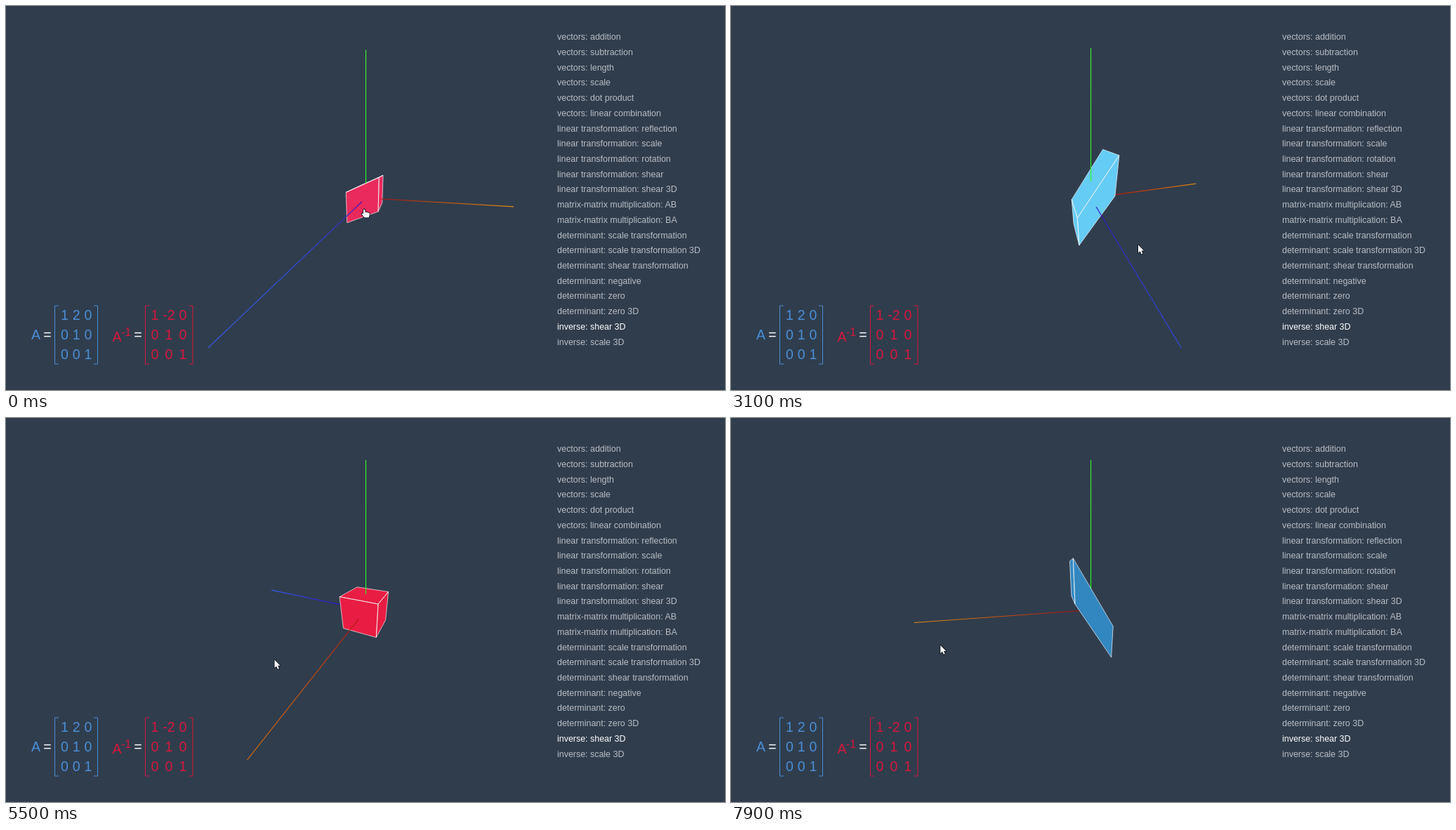
An HTML page with a canvas for the animation above (8000 ms loop, 1024x547 px).

```html
<!DOCTYPE html>
<html lang="en">
<head>
<meta charset="utf-8">
<title>Inverse of a 3D shear</title>
<style>
  html, body { margin: 0; width: 100%; height: 100%; overflow: hidden; background: #303d4d; }
  svg, canvas { position: absolute; left: 0; top: 0; width: 1024px; height: 547px; }
  text { font-family: "Liberation Sans", Arial, sans-serif; }
  .menu { font-size: 12.45px; fill: #b9bec4; }
  .menu .on { fill: #fff; }
  .math { font-size: 19.6px; text-anchor: middle; fill: #fff; }
  .math path { fill: none; stroke-width: 1; }
  .a text { fill: #4a8fd8; } .a path { stroke: #4a8fd8; }
  .b text { fill: #d8173d; } .b path { stroke: #d8173d; }
</style>
</head>
<body>
<svg viewBox="0 0 1024 547">
  <g class="menu" id="menu"></g>
  <g class="math">
    <g class="a" id="matA"><text x="42.5" y="474.8">A</text><path d="M75 427H69.5V510H75M125 427H130.5V510H125"/></g>
    <text x="59" y="474.8">=</text>
    <g class="b" id="matB"><text x="158" y="477.6">A</text><text x="171" y="469.6" font-size="16">-1</text><path d="M204 427H198.5V510H204M260.5 427H266V510H260.5"/></g>
    <text x="188" y="474.8">=</text>
  </g>
</svg>
<canvas id="scene" width="1024" height="547"></canvas>
<script>
const ns = 'http://www.w3.org/2000/svg';
function addText(parent, x, y, string, cls) {
  const el = document.createElementNS(ns, 'text');
  el.setAttribute('x', x);
  el.setAttribute('y', y);
  if (cls) el.setAttribute('class', cls);
  el.textContent = string;
  document.getElementById(parent).append(el);
}

const topics = {
  'vectors': ['addition', 'subtraction', 'length', 'scale', 'dot product', 'linear combination'],
  'linear transformation': ['reflection', 'scale', 'rotation', 'shear', 'shear 3D'],
  'matrix-matrix multiplication': ['AB', 'BA'],
  'determinant': ['scale transformation', 'scale transformation 3D', 'shear transformation', 'negative', 'zero', 'zero 3D'],
  'inverse': ['shear 3D', 'scale 3D']
};
Object.entries(topics)
  .flatMap(([topic, items]) => items.map(item => `${topic}: ${item}`))
  .forEach((s, i) => addText('menu', 785, 48.2 + i * 21.72, s, s === 'inverse: shear 3D' ? 'on' : ''));

function addMatrix(id, x, step, rows) {
  rows.forEach((row, r) => row.split(' ').forEach((n, c) => addText(id, x + c * step, 446.7 + r * 28, n)));
}
addMatrix('matA', 83.5, 16.7, ['1 2 0', '0 1 0', '0 0 1']);
addMatrix('matB', 212, 20, ['1 -2 0', '0 1 0', '0 0 1']);

// Lengths are in units of one axis.
const LOOP = 8000, STEP = 100;
const CX = 512.5, CY = 273.5, TOP = 60, BOTTOM = 487;
const FOCAL = (BOTTOM - TOP) / 2 / Math.tan(50 * Math.PI / 180);
const HALF = 0.125, NEAR = 0.12;
const SHEAR_TIME = 3030, SHEAR_START = -708;

// Turning points of the drag, as [time, angle].
const yawTurns = [[0, 14], [1860, 14], [2950, -17.5], [4200, 20.5], [6690, 192.6], [7100, 192.6], [8000, 166]];
const pitchTurns = [[0, 13.7], [1700, 13.7], [2950, 28.2], [4200, 33.2], [5400, 31.5], [6600, 12.6], [7100, 12.6], [8000, 18.1]];

// Colours over one shear (phase 0 to 1) and its inverse (1 to 2).
const tints = [
  [0, 232, 26, 60], [.23, 236, 41, 91], [.58, 7, 125, 145], [.87, 55, 136, 197],
  [1.26, 101, 205, 245], [1.59, 150, 0, 19], [2, 232, 26, 60]
];
const axes = [
  { dir: [1, 0, 0], from: [170, 0, 12], to: [225, 140, 15] },
  { dir: [0, 1, 0], from: [40, 250, 40], to: [65, 240, 45] },
  { dir: [0, 0, 1], from: [45, 0, 190], to: [50, 100, 240] }
];
// Corner numbers: bit 0 is x, bit 1 is y, bit 2 is z.
const faces = {
  right: [1, 3, 7, 5], left: [0, 4, 6, 2], top: [2, 6, 7, 3],
  bottom: [0, 1, 5, 4], front: [4, 5, 7, 6], back: [0, 2, 3, 1]
};

const ctx = document.getElementById('scene').getContext('2d');
const mix = (a, b, u) => a + (b - a) * u;
const smooth = u => u * u * (3 - 2 * u);
const linear = u => u;
const rgb = c => `rgb(${c.map(Math.round).join()})`;

function sample(track, t, ease) {
  const i = track.findIndex(key => key[0] > t);
  const a = track[i - 1], b = track[i];
  const u = ease((t - a[0]) / (b[0] - a[0]));
  return a.slice(1).map((v, n) => mix(v, b[n + 1], u));
}

function makeCamera(yaw, pitch, distance) {
  const rad = Math.PI / 180;
  const cy = Math.cos(yaw * rad), sy = Math.sin(yaw * rad);
  const cp = Math.cos(pitch * rad), sp = Math.sin(pitch * rad);
  const depth = ([x, y, z]) => distance - (x * sy + z * cy) * cp - y * sp;
  const project = p => {
    const [x, y, z] = p, w = FOCAL / depth(p);
    return [CX + (x * cy - z * sy) * w, CY - (y * cp - (x * sy + z * cy) * sp) * w];
  };
  return { depth, project };
}

function trace(points) {
  ctx.beginPath();
  points.forEach(p => ctx.lineTo(...p));
}

function drawAxis({ dir, from, to }, start, cam) {
  const at = a => dir.map(v => v * a);
  const d0 = cam.depth([0, 0, 0]), slope = cam.depth(dir) - d0;
  const end = d0 + slope < NEAR ? (NEAR - d0) / slope : 1;
  const p = cam.project(at(start)), q = cam.project(at(end));
  const w0 = 1 / cam.depth(at(start)), w1 = 1 / cam.depth(at(end));
  const paint = ctx.createLinearGradient(...p, ...q);
  for (let i = 0; i <= 12; i++) {
    const u = i / 12;
    const a = mix(start * w0, end * w1, u) / mix(w0, w1, u);
    paint.addColorStop(u, rgb(from.map((v, n) => mix(v, to[n], a))));
  }
  trace([p, q]);
  ctx.strokeStyle = paint;
  ctx.stroke();
}

function drawScene(t) {
  const [yaw] = sample(yawTurns, t, smooth), [pitch] = sample(pitchTurns, t, smooth);
  const phase = (t - SHEAR_START) / SHEAR_TIME % 2;
  const k = 2 * (1 - Math.abs(1 - phase));
  const clicks = [500, 800, 1100].filter(time => t >= time).length;
  const cam = makeCamera(yaw, pitch, 1.0607 * 0.95 ** clicks);

  const corners = [...Array(8).keys()].map(n => {
    const [x, y, z] = [1, 2, 4].map(bit => n & bit ? HALF : -HALF);
    return cam.project([x, y + k * x, z]);
  });
  const outline = name => faces[name].map(n => corners[n]);
  const isVisible = name => {
    const [a, b, c] = outline(name);
    return (b[0] - a[0]) * (c[1] - a[1]) - (b[1] - a[1]) * (c[0] - a[0]) < 0;
  };
  // The face through which each axis leaves the box.
  const exits = [k > 1 ? 'bottom' : 'right', 'top', 'front'];
  const drawAxes = inFront => axes.forEach((axis, i) => {
    const start = i ? HALF : HALF / Math.max(1, k);
    if (isVisible(exits[i]) === inFront) drawAxis(axis, start, cam);
  });

  ctx.save();
  ctx.beginPath();
  ctx.rect(0, TOP, 1024, BOTTOM - TOP);
  ctx.clip();
  ctx.lineWidth = 1.15;
  ctx.lineJoin = 'round';
  drawAxes(false);
  const shown = Object.keys(faces).filter(isVisible);
  ctx.fillStyle = rgb(sample(tints, phase, linear));
  shown.forEach(name => { trace(outline(name)); ctx.fill(); });
  ctx.lineWidth = 1;
  ctx.strokeStyle = 'rgba(255,255,255,.65)';
  shown.forEach(name => { trace(outline(name)); ctx.closePath(); ctx.stroke(); });
  ctx.lineWidth = 1.15;
  drawAxes(true);
  ctx.restore();
  drawCursor(t, yaw, pitch);
}

const arrow = new Path2D('M0 0V11.5L2.6 9L4.6 13.2L6.4 12.4L4.6 8.3H8Z');
const hand = new Path2D('M3 1.2Q4.2 -.4 5.3 1.2V4.4L10.5 5.6Q12 6.2 11.8 8L10.8 12.2H4.6L.6 7.6Q.4 6.2 2 6.5L3 7.2Z');

// The pointer goes to its grab point, then drags the camera.
function drawCursor(t, yaw, pitch) {
  const approach = Math.min(1, Math.max(0, (t - 1300) / 500));
  const x = mix(506, 533.8 - 1.54 * (yaw - 14), approach);
  const y = mix(289, 317 + 1.58 * (pitch - 13.7), approach);
  const shape = approach < .4 ? hand : arrow;
  ctx.save();
  ctx.translate(x, y);
  ctx.lineJoin = 'round';
  ctx.lineWidth = 1.8;
  ctx.strokeStyle = '#10151c';
  ctx.stroke(shape);
  ctx.fillStyle = '#fff';
  ctx.fill(shape);
  ctx.restore();
}

const begin = performance.now();
function frame() {
  const t = (performance.now() - begin) % LOOP;
  ctx.clearRect(0, 0, 1024, 547);
  drawScene(Math.floor(t / STEP) * STEP);
  requestAnimationFrame(frame);
}
frame();
</script>
</body>
</html>
```
